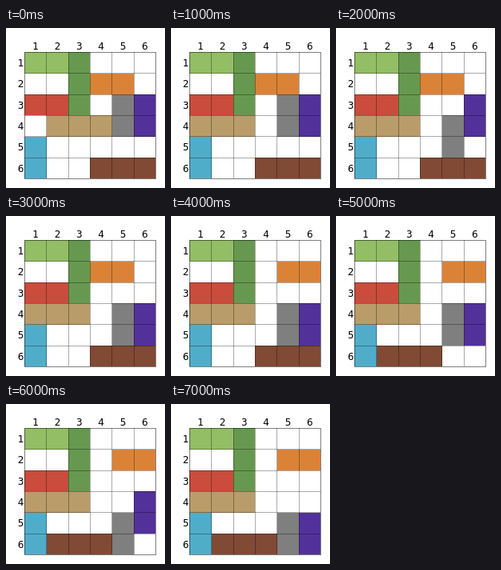
An HTML page with a canvas for the animation above (8 s loop, 199 by 200 pixels).

```html
<!DOCTYPE html>
<html lang="en">
<head>
<meta charset="utf-8">
<title>Sliding blocks</title>
<style>
html, body { margin: 0; width: 100%; height: 100%; overflow: hidden; background: #fff; }
canvas { display: block; }
</style>
</head>
<body>
<canvas id="board" width="199" height="200"></canvas>
<script>
const ctx = document.getElementById('board').getContext('2d');
const SIZE = 6, LEFT = 23, TOP = 30, WIDTH = 164, HEIGHT = 158;
const STEP = 1000, STEPS = 8;

// Zero-based column and row, then width and height in cells.
const blocks = {
  lime:   { col: 0, row: 0, w: 2, h: 1, color: '#93be66' },
  green:  { col: 2, row: 0, w: 1, h: 3, color: '#66994f' },
  orange: { col: 3, row: 1, w: 2, h: 1, color: '#da8337' },
  red:    { col: 0, row: 2, w: 2, h: 1, color: '#c94c3d' },
  gray:   { col: 4, row: 2, w: 1, h: 2, color: '#7f7f7f' },
  purple: { col: 5, row: 2, w: 1, h: 2, color: '#52319b' },
  tan:    { col: 1, row: 3, w: 3, h: 1, color: '#ba9c6a' },
  cyan:   { col: 0, row: 4, w: 1, h: 2, color: '#50adca' },
  brown:  { col: 3, row: 5, w: 3, h: 1, color: '#804a34' }
};

const moves = [
  ['tan', -1, 0], ['gray', 0, 1], ['purple', 0, 1], ['orange', 1, 0],
  ['brown', -2, 0], ['gray', 0, 1], ['purple', 0, 1]
];

const gridX = i => LEFT + WIDTH * i / SIZE;
const gridY = i => TOP + HEIGHT * i / SIZE;

function drawBlock(name, step) {
  let { col, row, w, h, color } = blocks[name];
  for (const [mover, dx, dy] of moves.slice(0, step)) {
    if (mover === name) {
      col += dx;
      row += dy;
    }
  }
  const x = Math.ceil(gridX(col)), y = Math.ceil(gridY(row));
  ctx.fillStyle = color;
  ctx.fillRect(x, y, Math.ceil(gridX(col + w)) - x, Math.ceil(gridY(row + h)) - y);
}

function drawGrid() {
  ctx.fillStyle = 'rgba(0, 0, 0, 0.33)';
  for (let i = 1; i < SIZE; i++) {
    ctx.fillRect(Math.round(gridX(i)), TOP, 1, HEIGHT);
    ctx.fillRect(LEFT, Math.round(gridY(i)), WIDTH, 1);
  }
  ctx.strokeStyle = 'rgba(0, 0, 0, 0.5)';
  ctx.lineWidth = 1;
  ctx.strokeRect(LEFT + 0.5, TOP + 0.5, WIDTH, HEIGHT);
}

function drawLabels() {
  ctx.fillStyle = '#000';
  ctx.font = '12px "DejaVu Sans", sans-serif';
  ctx.textAlign = 'center';
  ctx.textBaseline = 'alphabetic';
  for (let i = 0; i < SIZE; i++) {
    ctx.fillText(i + 1, gridX(i + 0.5) + 0.5, 27);
    ctx.fillText(i + 1, 18.5, Math.round(gridY(i + 0.5) + 4.9));
  }
}

function draw(step) {
  ctx.fillStyle = '#fff';
  ctx.fillRect(0, 0, 199, 200);
  for (const name in blocks) drawBlock(name, step);
  drawGrid();
  drawLabels();
}

const start = performance.now();
function tick() {
  const elapsed = Math.max(0, performance.now() - start);
  draw(Math.floor(elapsed / STEP) % STEPS);
  requestAnimationFrame(tick);
}
tick();
</script>
</body>
</html>
```
